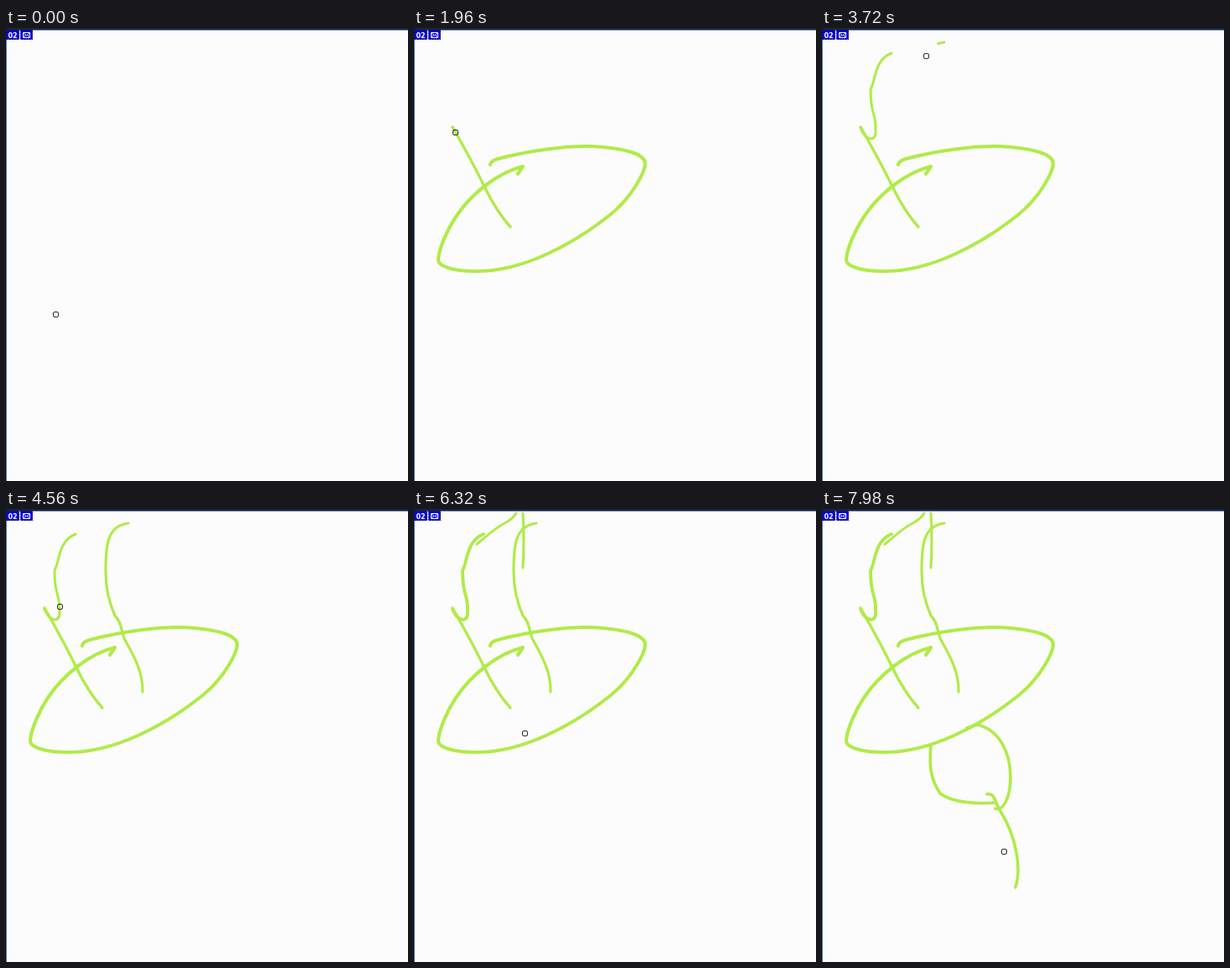
These frames come from a looping animation (480 by 540 pixels, 8000 ms). An HTML page:

```html
<!DOCTYPE html>
<html lang="en">
<head>
<meta charset="utf-8">
<title>Sketching a hat</title>
<style>
  html, body { margin: 0; width: 100%; height: 100%; overflow: hidden; background: #fcfcfc; }
  svg { display: block; width: 100vw; height: 100vh; }
  #ink { fill: none; stroke: #b0eb48; stroke-linecap: round; stroke-linejoin: round; filter: blur(.55px); }
</style>
</head>
<body>
<svg viewBox="0 0 480 540">
  <rect width="480" height="540" fill="#fcfcfc"/>
  <g id="ink"></g>
  <path d="M.5 540V2.5H480" fill="none" stroke="#5c80c0"/>
  <rect width="480" height="2" fill="#20242c"/>
  <g fill="#0000d8" stroke="#000050" stroke-dasharray="2 1">
    <rect x=".5" y="2.5" width="15" height="11"/>
    <rect x="17.5" y="2.5" width="14" height="11"/>
  </g>
  <text x="8" y="11.5" text-anchor="middle" font-family="'DejaVu Sans', sans-serif" font-size="8" font-weight="bold" fill="#fff">02</text>
  <path d="M20.5 5.5h8v6h-8zM21 6l3.5 3L28 6M21 11l2.5-2.5M28 11l-2.5-2.5" fill="none" stroke="#fff"/>
  <rect id="cursor" x="-2.5" y="-2.5" width="6" height="6" rx="1.8" fill="none" stroke="#111"/>
</svg>
<script>
const LOOP = 8000, STEP = 20, LAG = 75;

const BRIM = `M124,174 L130,165 C100,172 68,198 50,225 C40,240 30,262 29,276
  C29,286 53,290 75,290 C130,290 190,258 235,222 C262,200 276,170 276,162
  C277,150 250,144 226,142 C185,138 130,148 100,156 Q92,158 91,163`;
const HOOK = 'M46,119 C51,133 64,137 64,124 C65,98 58,108 58,73 C64,64 62,38 83,30';
const CROWN = `M146,17 C120,20 119,45 119,75 C119,100 126,118 130,127
  C139,136 137,146 142,156 C152,174 164,194 163,218`;
const dot = (x, y) => `M${x},${y}h.1`;

// The pen hovers from one stroke to the next, bent towards `via`, and rests for `pause` before it.
// `power` above 1 slows a stroke down, below 1 speeds it up. Strokes without width leave no ink.
const strokes = [
  { d: dot(59, 341), start: 0, end: 0 },
  { d: BRIM, start: 250, end: 1250, width: 4.1, power: 1.25, via: [-70, -225] },
  { d: 'M115,237 Q98,218 84,189 T46,118', start: 1660, end: 1880, width: 3.4, pause: 80, via: [105, 275] },
  { d: HOOK, start: 1930, end: 2750, width: 3, power: 1.25 },
  { d: CROWN, start: 3620, end: 4240, width: 3.2, power: 0.8, via: [230, 110] },
  { d: HOOK, start: 4480, end: 4760, width: 3.8, via: [850, 320] },
  { d: 'M75,42 Q98,22 108,17 T122,5', start: 4790, end: 4920, width: 3 },
  { d: 'M130,5 Q132,38 130,70', start: 4980, end: 5120, width: 3.2 },
  { d: dot(473, 155), start: 5280, end: 5580, hidden: true },
  { d: dot(261, 275), start: 5580, end: 5580 },
  { d: 'M130,282 C127,312 132,325 141,339 C155,350 185,352 208,350', start: 6680, end: 6940, width: 3.6, pause: 280, via: [190, -267] },
  { d: 'M173,261 L186,257 C212,264 225,290 225,320 C225,345 216,360 207,357', start: 7100, end: 7330, width: 3.6, via: [190, 40] },
  { d: 'M197,340 C207,338 206,350 213,360 C233,392 238,430 231,451', start: 7650, end: 7860, width: 3.6, via: [60, 222] },
  { d: dot(217, 408), start: 7980, end: LOOP, via: [232, 440] },
];

const inkLayer = document.getElementById('ink');
const cursor = document.getElementById('cursor');
const clamp = u => Math.max(0, Math.min(1, u));
const smooth = u => u * u * (3 - 2 * u);

function makePath(d) {
  const path = document.createElementNS('http://www.w3.org/2000/svg', 'path');
  path.setAttribute('d', d);
  return path;
}

function pointAt(path, fraction) {
  const { x, y } = path.getPointAtLength(fraction * path.getTotalLength());
  return [x, y];
}

strokes.forEach((stroke, i) => {
  stroke.path = makePath(stroke.d);
  stroke.length = stroke.path.getTotalLength();
  if (stroke.width) {
    stroke.path.setAttribute('stroke-width', stroke.width);
    inkLayer.append(stroke.path);
  }
  if (i === 0) return;
  const from = pointAt(strokes[i - 1].path, 1), to = pointAt(stroke.path, 0);
  stroke.hover = makePath(`M${from} Q${stroke.via || from} ${to}`);
});

function progress({ start, end, power = 1 }, t) {
  return end > start ? 1 - (1 - clamp((t - start) / (end - start))) ** power : Number(t >= start);
}

function penAt(t) {
  const next = strokes.findIndex(s => s.start > t);
  const current = strokes[next < 0 ? strokes.length - 1 : next - 1];
  if (t < current.end || next < 0) return pointAt(current.path, progress(current, t));
  const { hover, start, pause = 0 } = strokes[next];
  return pointAt(hover, smooth(clamp((t - current.end) / (start - pause - current.end))));
}

function render(t) {
  for (const s of strokes) {
    if (!s.width) continue;
    const drawn = progress(s, t - LAG) * s.length;
    s.path.style.display = drawn > 0 ? '' : 'none';
    s.path.setAttribute('stroke-dasharray', `${drawn} ${s.length + 1}`);
  }
  const [x, y] = penAt(t).map(Math.round);
  cursor.setAttribute('transform', `translate(${x} ${y})`);
  const away = strokes.some(s => s.hidden && t >= s.start && t < s.end);
  cursor.style.display = away ? 'none' : '';
}

const origin = performance.now();
function tick() {
  const elapsed = (performance.now() - origin) % LOOP;
  render(Math.floor(elapsed / STEP) * STEP);
  requestAnimationFrame(tick);
}
tick();
</script>
</body>
</html>
```
